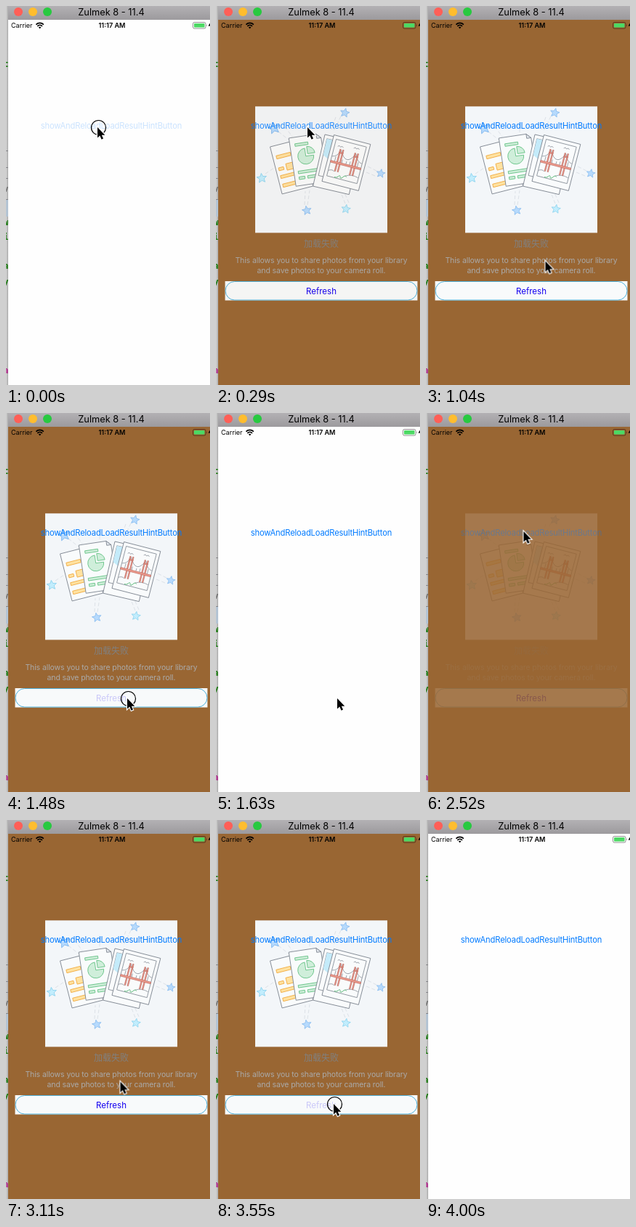
Write an HTML page that moves like this. It is 281x522 px and loops after 4.15 s.

```html
<!DOCTYPE html>
<html lang="en">
<head>
<meta charset="utf-8">
<title>Load result hint</title>
<style>
html, body { margin: 0; width: 100%; height: 100%; overflow: hidden; background: #fefefe; }
svg { display: block; width: 281px; height: 522px; font-family: Inter, Roboto, sans-serif; }
.mid { text-anchor: middle; }
.code { font: 600 13px "Noto Sans Mono", "DejaVu Sans Mono", monospace; text-anchor: end; }
.trigger { font-size: 11.2px; letter-spacing: -.15px; fill: #007aff; }
.message { font-size: 10.5px; letter-spacing: -.1px; fill: #aaa; }
.heading { font: 500 12px "Noto Sans CJK SC", "Noto Sans CJK", sans-serif; fill: #808080; }

.screen, .hint, .trigger, .refresh, .pointer, .ring {
  animation: 4150ms step-end infinite;
}
.screen { animation-name: screen; }
.hint { animation-name: hint; }
.trigger { animation-name: trigger; }
.refresh { animation-name: refresh; }
.pointer { animation-name: pointer; }
.ring { animation-name: ring; }

@keyframes screen {
  0%, 39.27%, 85.78%, 100% { opacity: 0; }
  3.61%, 60.72% { opacity: 1; }
}
@keyframes hint {
  0%, 39.27%, 85.78%, 100% { opacity: 0; }
  3.61% { opacity: .4; }
  6.98% { opacity: .97; }
  10.6%, 67.71% { opacity: 1; }
  60.72% { opacity: .13; }
  64.33% { opacity: .85; }
}
@keyframes trigger {
  0%, 57.1%, 100% { opacity: .2; }
  3.61% { opacity: .5; }
  6.98% { opacity: .86; }
  10.6%, 71.32% { opacity: 1; }
  60.72% { opacity: .35; }
  64.33% { opacity: .75; }
  67.71% { opacity: .95; }
}
@keyframes refresh {
  0%, 39.27%, 85.78%, 100% { opacity: 1; }
  35.66%, 82.16% { opacity: .2; }
}
@keyframes ring {
  0%, 35.66%, 57.1%, 82.16% { opacity: 1; }
  3.61%, 39.27%, 60.72%, 85.78%, 100% { opacity: 0; }
}
@keyframes pointer {
  0%, 100% { transform: translate(126px, 167px); }
  17.83% { transform: translate(127px, 186px); }
  21.44% { transform: translate(138px, 261px); }
  25.06% { transform: translate(164.5px, 351.5px); }
  28.67% { transform: translate(167px, 384px); }
  32.04% { transform: translate(167px, 393px); }
  42.89% { transform: translate(161px, 345px); }
  46.26% { transform: translate(149px, 258px); }
  49.87% { transform: translate(138px, 186px); }
  53.49% { transform: translate(134.5px, 163px); }
  71.32% { transform: translate(142px, 254px); }
  74.93% { transform: translate(157.5px, 360.5px); }
  78.55% { transform: translate(162px, 391px); }
  89.15% { transform: translate(186px, 418px); }
  92.77% { transform: translate(238px, 476px); }
  96.38% { transform: translate(300px, 540px); }
}
</style>
</head>
<body>
<svg viewBox="0 0 281 522">
  <defs>
    <linearGradient id="bar" x2="0" y2="1">
      <stop stop-color="#b3b1b4"/><stop offset="1" stop-color="#9c9a9d"/>
    </linearGradient>
    <linearGradient id="edge">
      <stop stop-color="#d4d4d4"/><stop offset="1" stop-color="#a9a9a9"/>
    </linearGradient>
    <path id="star" d="M0-7 2-2.4 7-2 3.2 1.3 4.3 6 0 3.5-4.3 6-3.2 1.3-7-2-2-2.4Z"/>
  </defs>

  <!-- editor peeking out on the left -->
  <rect width="3" height="522" fill="url(#edge)"/>
  <rect y="267" width="3" height="23" fill="#b4c4d4"/>
  <path d="M0 199.5H3M0 222.5H3M0 237.5H3M0 266.5H3" stroke="#85858a"/>
  <g class="code" fill="#1d7a12">
    <text x="3.6" y="84">t</text>
    <text x="3.6" y="302">w</text>
    <text x="3.6" y="322">i</text>
    <text x="3.6" y="362">a</text>
    <text x="3.6" y="384">y</text>
    <text x="3.6" y="256" fill="#777">v</text>
    <text x="3.6" y="506" fill="#b02a8c">a</text>
  </g>

  <!-- window -->
  <rect x="3" width="278" height="19" fill="url(#bar)"/>
  <circle cx="17" cy="8" r="6" fill="#ff5f57"/>
  <circle cx="37" cy="8" r="6" fill="#ffbd2e"/>
  <circle cx="57" cy="8" r="6" fill="#28c940"/>
  <text class="mid" x="145" y="13" font-size="12.8">Zulmek 8 - 11.4</text>
  <rect x="3" y="19" width="278" height="503" fill="#fefefe"/>
  <rect class="screen" x="3" y="19" width="278" height="503" fill="#963"/>

  <!-- status bar -->
  <text x="7" y="30" font-size="9">Carrier</text>
  <path d="M41.4 25.6a7.3 7.3 0 0 1 10.4 0M43.3 27.8a4.7 4.7 0 0 1 6.6 0" fill="none" stroke="#000" stroke-width="1.7"/>
  <path d="M46.6 31.2 44.9 29.4a2.5 2.5 0 0 1 3.4 0Z"/>
  <text class="mid" x="146" y="30" font-size="9.1" font-weight="600">11:17 AM</text>
  <rect x="257.5" y="22.5" width="17.5" height="8.5" rx="2" fill="none" stroke="#000" stroke-opacity=".42"/>
  <rect x="259" y="24" width="14.5" height="5.5" rx=".8" fill="#4cd964"/>
  <path d="M276 25.3q1.6 1.4 0 2.9Z" fill-opacity=".45"/>
  <path d="M281 23.5 278.6 27.4H281Z"/>

  <g class="hint">
    <rect x="54" y="138.3" width="182" height="174.1" fill="#f3f6f9"/>

    <!-- stars and their trails -->
    <path fill="none" stroke="#dde2e8" stroke-dasharray="5 3" d="M86 173l15 12M95 166l10 14M172 152l-10 20M165 153l-6 17M68 231l12-8M126 274l3-20M122 274l1-19M178 272l-6-15M183 271l-7-16M221 227l-12-6M219 234l-12-5M129 161v16"/>
    <g fill="#b6dafd" stroke="#83b9ef" stroke-width=".8">
      <use href="#star" transform="translate(80 168) rotate(-12) scale(1.15)"/>
      <use href="#star" transform="translate(177.5 147) rotate(12) scale(.9)"/>
      <use href="#star" transform="translate(125 281.5) rotate(-10) scale(.9)"/>
      <use href="#star" transform="translate(227 230.5) rotate(10) scale(.85)"/>
      <g fill="#c2edfd" stroke="#83d0ee">
        <use href="#star" transform="translate(63 237) rotate(-6) scale(.95)"/>
        <use href="#star" transform="translate(179 279.5) rotate(8) scale(.88)"/>
      </g>
    </g>

    <g fill="#f9fbfc" stroke="#848b95" stroke-width=".9">
      <!-- list page -->
      <g transform="translate(74.500 194) rotate(-14.300)">
        <path d="M0 0H44V67H0Z"/>
        <path d="M5 14H25V18.500H5ZM15 28H25V37H15ZM4 31H11V35H4ZM4 42H27V46H4ZM4 54H22V58.500H4Z" fill="#ffe2a0" stroke="#f2b04a"/>
      </g>
      <!-- chart page -->
      <g transform="translate(100.300 182) rotate(-8.500)">
        <path d="M0 0H38L44 6V67H0Z"/>
        <path d="M38 0V6H44Z" fill="#e3e8ee"/>
        <g fill="#cfeeda" stroke="#6cc58a">
          <path d="M7 9H25V12.500H7Z"/>
          <path d="M19.500 17A11 11 0 1 0 30.500 28H19.500Z"/>
          <path d="M22.500 15A10 10 0 0 1 32.500 25H22.500Z"/>
          <path d="M6 47H36V50.500H6ZM6 55H14V58.500H6ZM18 55H36V58.500H18Z"/>
        </g>
      </g>
      <!-- photo behind -->
      <g transform="translate(150 177) rotate(13)">
        <path d="M0 0H51V73H0Z"/>
        <path d="M4 5H46V57H4Z" stroke-width=".8"/>
        <path d="M4 5H18V35L4 28Z" fill="#c4ebfa" stroke="none"/>
      </g>
      <!-- bridge photo -->
      <g transform="translate(162.500 177.500) rotate(14.500)">
        <path d="M0 0H52V66H0Z"/>
        <path d="M4.500 5H47.500V57H4.500Z" stroke-width=".8"/>
        <g fill="none" stroke-width=".7">
          <path d="M9 14q2-3 4 0 2-3 4 0M31 11q2-3 4 0 2-3 4 0M5 29Q12 28 15 18 26 39 36 18 40 28 47 29"/>
          <path d="M20 30V35M26 31V35M31 30V35M10 28V35M42 28V35M5 49q5-3 8 0M29 51q8-5 18-2"/>
        </g>
        <g fill="#f09c8e" stroke="#b7685f" stroke-width=".6">
          <path d="M13 17H14.500V48H13ZM17 17H18.500V48H17ZM34 17H35.500V48H34ZM38 17H39.500V48H38Z"/>
          <path d="M13 21H18.500V22.500H13ZM34 21H39.500V22.500H34Z"/>
          <path d="M4.500 35H47.500V37.500H4.500Z"/>
        </g>
        <path d="M15 56q3 1 5-2 2-3 3 0 0 3 3 0 3-5 5-2" fill="none" stroke="#58b878"/>
      </g>
    </g>

    <text class="mid heading" x="145" y="332">加载失败</text>
    <text class="mid message" x="145" y="354">This allows you to share photos from your library</text>
    <text class="mid message" x="145" y="368">and save photos to your camera roll.</text>
    <rect x="12.5" y="379" width="265" height="26.5" fill="#f8fafb"/>
    <rect x="13" y="379.5" width="264" height="25.5" rx="12.7" fill="none" stroke="#3ba9d6" stroke-width=".9"/>
    <text class="mid refresh" x="145" y="396.5" font-size="11.5" fill="#1400f0">Refresh</text>
  </g>

  <text class="mid trigger" x="145" y="169">showAndReloadLoadResultHintButton</text>

  <g class="pointer">
    <circle class="ring" cx="1.5" cy=".5" r="10" fill="none" stroke="#000" stroke-width="1.2"/>
    <path d="M0 0V14.6L3.3 11.5 5.6 16.7 8 15.6 5.8 10.7H10.3Z" stroke="#fff" stroke-width="2.2" paint-order="stroke"/>
  </g>
</svg>
</body>
</html>
```
